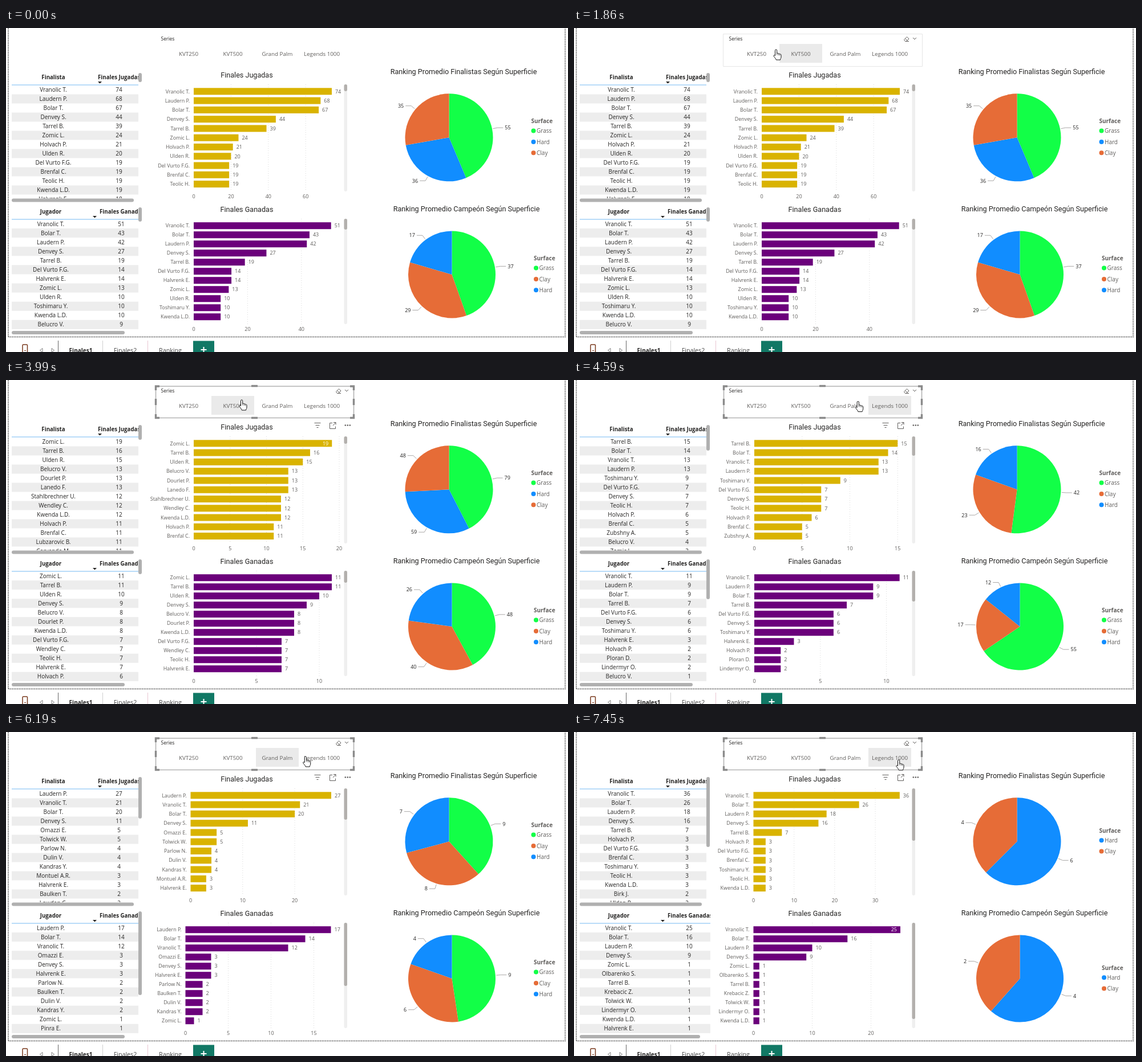
Recreate the animation shown at these times as an HTML page. Size 985 px wide and 569 px high, loop 8000 ms.

```html
<!DOCTYPE html>
<html lang="es">
<head>
<meta charset="utf-8">
<title>Finales</title>
<style>
html, body { margin: 0; width: 100%; height: 100%; overflow: hidden; background: #fff; }
svg { display: block; width: 985px; height: 569px; font-family: "Open Sans", "Noto Sans", sans-serif; }
.title { font-family: Roboto, sans-serif; }
</style>
</head>
<body>
<svg id="stage" viewBox="0 0 985 569"></svg>
<script>
const LOOP = 8000, GREY = '#605e5c', INK = '#252423';
const KEYS = 'abcdefghijklmnopqrstuvwxyzABCDEFGHIJ';
const NAMES = ('Vranolic T.|Laudern P.|Bolar T.|Denvey S.|Tarrel B.|Zomic L.|Holvach P.|Ulden R.|Del Vurto F.G.|' +
  'Brenfal C.|Teolic H.|Kwenda L.D.|Halvrenk E.|Toshimaru Y.|Belucro V.|Dourlet P.|Lanedo F.|Stahlbrechner U.|' +
  'Wendley C.|Lubzarovic B.|Corvando M.|Zubshny A.|Ploran D.|Lindermyr O.|Omazzi E.|Tolwick W.|Parlow N.|' +
  'Dulin V.|Kandras Y.|Montuel A.R.|Baulken T.|Pinra E.|Lowden C.|Birk J.|Olbarenko S.|Krebacic Z.').split('|');
const COLORS = { Grass: '#12ff47', Hard: '#118dff', Clay: '#e66c37' };
const SERIES = ['KVT250', 'KVT500', 'Grand Palm', 'Legends 1000'];
const TILE_X = [282.5, 360, 438, 516];

// axis: [zero x, px per unit, tick step, last tick, thumb bottom]
const STATES = [
  { played: 'a74 b68 c67 d44 e39 f24 g21 h20 i19 j19 k19 l19 m18', axisP: [329, 3.27, 20, 60, 111],
    won: 'a51 c43 b42 d27 e19 i14 m14 f13 h10 n10 l10 o9', axisW: [329, 4.72, 20, 40, 354],
    pieP: 'Grass 55 Hard 36 Clay 35', pieW: 'Grass 37 Clay 29 Hard 17' },
  { played: 'f19 e16 h15 o13 p13 q13 r12 s12 l12 g11 j11 t11 u11', axisP: [329, 12.75, 5, 20, 112], insideP: true,
    won: 'f11 e11 h10 d9 o8 p8 l8 i7 s7 k7 m7 g6', axisW: [329, 22, 5, 10, 356],
    pieP: 'Grass 79 Hard 59 Clay 48', pieW: 'Grass 48 Clay 40 Hard 26' },
  { played: 'e15 c14 a13 b13 n9 i7 d7 k7 g6 j5 v5 o4 f3', axisP: [316, 16.75, 5, 15, 133],
    won: 'a11 b9 c9 e7 i6 d6 n6 m3 g2 w2 x2 o1', axisW: [316, 23.15, 5, 10, 389],
    pieP: 'Grass 42.2 Clay 23 Hard 15.8', pieW: 'Grass 55 Clay 17 Hard 12' },
  { played: 'b27 a21 c20 d11 y5 z5 A4 B4 C4 D3 m3 E2 G2', axisP: [323.5, 9.13, 10, 20, 154],
    won: 'b17 c14 a12 y3 d3 m3 A2 E2 B2 C2 f1 F1', axisW: [314.5, 15, 5, 15, 446],
    pieP: 'Grass 9.2 Clay 7.8 Hard 7', pieW: 'Grass 9 Clay 6.2 Hard 3.7' },
  { played: 'a36 c26 b18 d16 e7 g3 i3 j3 n3 k3 l3 H2 h2', axisP: [314.5, 7.12, 10, 30, 191],
    won: 'a25 c16 b10 d9 f1 I1 e1 J1 z1 x1 l1 m1', axisW: [314.5, 10.3, 10, 20, 504], insideW: true, wide: true,
    pieP: 'Hard 6.25 Clay 3.75', pieW: 'Hard 3.9 Clay 2.44' }
];

const text = (x, y, s, size = 10, fill = GREY, anchor = 'middle', extra = '') =>
  `<text x="${x}" y="${y + size * .36}" font-size="${size}" fill="${fill}" text-anchor="${anchor}" ${extra}>${s}</text>`;
const rect = (x, y, w, h, fill, extra = '') =>
  `<rect x="${x}" y="${y}" width="${w}" height="${h}" fill="${fill}" ${extra}/>`;
const path = (d, stroke = GREY, w = 1, extra = '') =>
  `<path d="${d}" fill="none" stroke="${stroke}" stroke-width="${w}" ${extra}/>`;
const group = (id, body, extra = '') => `<g id="${id}" ${extra}>${body}</g>`;
const parse = s => s.split(' ').map(p => ({ name: NAMES[KEYS.indexOf(p[0])], n: +p.slice(1) }));

function table(rows, clip, y0, step, nameX, valX, right, head) {
  let s = '';
  rows.forEach((r, i) => {
    const y = y0 + i * step;
    if (i % 2) s += rect(10, y - 8, right - 10, step, '#ededed');
    s += text(nameX, y, r.name, 10, INK) + text(valX, y, r.n, 10, INK);
  });
  const bold = 'font-weight="700"';
  s += text(nameX, head.y, head.a, 9.7, INK, 'middle', bold) + text(head.x, head.y, head.b, 9.7, INK, 'start', bold);
  s += path(`M10 ${head.y + 13.5}H${right}`, '#74b9f3', 1.2);
  s += `<path d="M${head.sort - 3.5} ${head.y + 7.5}h7l-3.5 3.5z" fill="${INK}"/>`;
  return `<g clip-path="url(#${clip})">${s}</g>`;
}

function bars(rows, axis, y0, step, color, inside, top, bottom) {
  const [x0, unit, tick, last, thumb] = axis;
  let s = '';
  for (let v = 0; v <= last; v += tick) {
    const x = x0 + v * unit;
    if (v) s += path(`M${x} ${top}V${bottom}`, '#d8d8d8', 1, 'stroke-dasharray="1 3"');
    s += text(x, bottom + 9, v, 9);
  }
  rows.slice(0, 11).forEach((r, i) => {
    const y = y0 + i * step, end = x0 + r.n * unit;
    s += rect(x0, y - 6, r.n * unit, 12, color) + text(x0 - 7, y, r.name, 8.9, GREY, 'end');
    s += inside && !i ? text(end - 6, y, r.n, 9, '#fff', 'end') : text(end + 6, y, r.n, 9, GREY, 'start');
  });
  return s + rect(592.5, top, 5.5, bottom - top, '#efefef', 'rx="2.7"') +
    rect(592.5, top, 5.5, thumb - top, '#b3b0ad', 'rx="2.7"');
}

function pie(data, cx, cy, r, legendX, legendY) {
  const p = data.split(' '), parts = [];
  for (let i = 0; i < p.length; i += 2) parts.push([p[i], +p[i + 1]]);
  const sum = parts.reduce((a, q) => a + q[1], 0);
  const pt = (a, d) => [cx + d * Math.sin(a), cy - d * Math.cos(a)];
  const top = legendY + (3 - parts.length) * 9.7;
  let a = 0, s = text(legendX, top, 'Surface', 10, GREY, 'start', 'font-weight="700"');
  parts.forEach(([name, v], i) => {
    const b = a + v / sum * 2 * Math.PI, mid = (a + b) / 2, side = Math.sin(mid) > 0 ? 1 : -1;
    const [ex, ey] = pt(mid, r + 9.5), x = ex + 10 * side;
    s += `<path d="M${cx} ${cy}L${pt(a, r)}A${r} ${r} 0 ${b - a > Math.PI ? 1 : 0} 1 ${pt(b, r)}Z" fill="${COLORS[name]}"/>`;
    s += path(`M${pt(mid, r + 1.5)}L${ex} ${ey}H${x}`, '#a19f9d', .9);
    s += text(x + 3 * side, ey, Math.round(v), 9, INK, side > 0 ? 'start' : 'end');
    const y = top + 17 + i * 19.4;
    s += `<circle cx="${legendX + 4}" cy="${y}" r="4" fill="${COLORS[name]}"/>` + text(legendX + 9.5, y, name, 10, GREY, 'start');
    a = b;
  });
  return s;
}

function slicer() {
  let s = text(271.5, 19, 'Series', 8.5, INK, 'start');
  s += rect(0, 28, 75, 33, '#eaeaea', 'id="tile"');
  SERIES.forEach((n, i) => s += text(TILE_X[i] + 37.5, 45, n, 9.8));
  s += group('slicerIcons', path('M578.5 20.5l5-5 3.500 3.500-4.500 4.500h-2zM580.500 18.500l3.500 3.500M582 23.500h5M594 17l3 3 3-3'));
  s += group('thin', path('M261.500 10.500H610.500V67.500H261.500Z', '#e6e6e6'));
  s += group('selected', path('M262.500 11H609.500V66.500H262.500Z', '#b3b3b3', 1.6) +
    path('M262.500 18V11H269M603 11H609.500V18M609.500 60V66.500H603M269 66.500H262.500V60M430 10.500H441M430 66.500H441M262.500 33V44M609.500 33V44', '#8a8a8a', 3.4));
  return s;
}

function footer() {
  let s = path('M4 0V542.500H980V0', '#333', 1.5, 'stroke-dasharray="1.5 1.5"');
  s += rect(29, 556, 8.5, 18, '#fff', 'rx="1.5" stroke="#7a3a1e" stroke-width="1.5"') + path('M32 566.500h3', '#7a3a1e');
  s += path('M64 562.500v7l-4.500-3.500zM80 562.500v7l4.500-3.500z', '#777', .9);
  s += path('M91.500 549V569', '#666') + path('M169.500 549V569', '#d0d0d0') + path('M248.500 549V569', '#e8c6d2');
  s += text(131, 566, 'Finales1', 10, INK, 'middle', 'font-weight="700"');
  s += text(209, 566, 'Finales2', 10.7, '#444') + text(288, 566, 'Ranking', 10.7, '#444');
  return s + rect(328, 549.5, 37, 20, '#117865') + path('M341.500 565h10M346.500 560v10', '#fff', 2);
}

function build() {
  const title = (x, y, s) => text(x, y, s, 12.6, INK, 'middle', 'class="title"');
  const clip = (id, y, w, h) => `<clipPath id="${id}"><rect x="10" y="${y}" width="${w}" height="${h}"/></clipPath>`;
  const bar = id => rect(232, 0, 6, 0, '#b0b0b0', `id="${id}" rx="3"`);
  let s = '<defs>' + clip('c1', 70, 222, 229) + clip('c2', 306, 222, 223) + clip('c3', 306, 229, 223) + '</defs>';
  s += rect(0, 0, 985, 569, '#fff') + footer();
  s += title(422, 82, 'Finales Jugadas') + title(422, 318.5, 'Finales Ganadas');
  s += title(802, 76, 'Ranking Promedio Finalistas Según Superficie');
  s += title(807, 317, 'Ranking Promedio Campeón Según Superficie');
  STATES.forEach((d, i) => {
    const played = parse(d.played), won = parse(d.won), right = d.wide ? 239 : 232;
    s += group('data' + i,
      table(played, 'c1', 108.5, 16, 83, 198, 232, { y: 86.5, x: 161, sort: 164.5, a: 'Finalista', b: 'Finales Jugadas' }) +
      table(won, d.wide ? 'c3' : 'c2', 344, 16.07, 78.5, 202, right, { y: 322.5, x: 164, sort: 155.5, a: 'Jugador', b: 'Finales Ganadas' }) +
      rect(10, 532, d.wide ? 211 : 198, 6, '#b0b0b0', 'rx="3"') +
      bars(played, d.axisP, 111.3, 16.28, '#d9b300', d.insideP, 99, 287) +
      bars(won, d.axisW, 347.2, 16, '#6b007b', d.insideW, 335, 520));
    s += group('pie' + i, pie(d.pieP, 776.5, 192.3, 77, 920.5, 163.5) + pie(d.pieW, 781.5, 433, 76.5, 925, 404.5));
  });
  s += rect(10, 299.5, 214, 6, '#b0b0b0', 'rx="3"') + bar('scrollP') + bar('scrollW') + slicer();
  s += group('tools', path('M540.500 75.500h11M542.500 79.500h7M544.500 83.500h3') +
    path('M572 75.500h-4.500v10h10v-4M574 74.500h4v4M578 74.500l-5 5.500') +
    [594.8, 598.8, 602.8].map(x => `<circle cx="${x}" cy="79.500" r="1.300" fill="${GREY}"/>`).join(''));
  s += group('tip', rect(577.5, 62.5, 82, 23, '#fff', 'stroke="#b5b5b5"') + text(618.5, 74, SERIES[3], 11, '#444'));
  s += group('arrow', '<path d="M0 0V15.500L3.600 12.200 6 17.800 8.300 16.800 6 11.400H11Z" fill="#fff" stroke="#000" stroke-width=".9"/>');
  s += group('hand', '<path d="M-1.500 1.500a1.600 1.600 0 0 1 3.200 0v5c1-.6 2.300-.3 2.600.5 1-.5 2.100 0 2.400.8 1.200-.3 2.300.4 2.300 1.600V13c0 2.300-1.500 3-1.500 5H.3c-.5-2.300-2.600-4-4.200-6.500-.8-1.500 1-2.500 2.200-1.200l.2.300z" fill="#fff" stroke="#111"/>' +
    path('M1.700 6.500v3M4.300 7v3M6.700 8v2.500', '#111', .7));
  stage.innerHTML = s;
}

// [start, end, steps, x, y]
const MOVES = [
  [660, 1450, 12, 430, 72], [1520, 1660, 3, 398, 42], [1860, 1860, 1, 354, 38], [1925, 1990, 2, 324, 29],
  [2260, 2330, 2, 318, 27], [2660, 2730, 2, 323, 37], [2990, 3260, 5, 420, 49], [3520, 3590, 2, 431, 50],
  [3790, 3990, 3, 413, 35], [4520, 4650, 3, 540, 39], [4850, 4990, 3, 480, 40], [5380, 5590, 3, 510, 41],
  [6190, 6390, 4, 569, 49]
];
const DATA = [[0, 0], [2730, 1], [4060, 2], [5660, 3], [7190, 4]];
const PIES = [[0, 0], [2730, 1], [4120, 2], [5730, 3], [7320, 4]];
const HOVER = [[0, -1], [1590, 1], [1925, 0], [3125, 1], [4585, 3], [4920, 2], [6290, 3]];
const SCROLL_P = [[0, 95], [2730, 215], [3060, 124], [3590, 105], [4060, 215], [4320, 145], [4520, 124], [5660, 215], [5930, 152], [7190, 202]];
const SCROLL_W = [[0, 340], [2730, 447], [3060, 358], [3590, 341], [4060, 447], [4320, 385], [5660, 462], [7190, 315]];

const at = (list, t) => list.reduce((v, e) => t >= e[0] ? e[1] : v, list[0][1]);

function cursor(t) {
  let x = 772, y = 464;
  MOVES.forEach(([a, b, n, tx, ty], i) => {
    if (t < a) return;
    let k = 1;
    if (t < b) {
      const step = Math.floor((t - a) / (b - a) * (n - 1));
      k = i ? (step + 1) / n : step / (n - 1);
    }
    x += (tx - x) * k;
    y += (ty - y) * k;
  });
  return [x, y];
}

const stage = document.getElementById('stage');
build();
const el = {};
stage.querySelectorAll('[id]').forEach(e => el[e.id] = e);
const show = (id, on) => el[id].style.display = on ? '' : 'none';

function draw(t) {
  const data = at(DATA, t), pies = at(PIES, t), hover = at(HOVER, t), [x, y] = cursor(t);
  STATES.forEach((_, i) => {
    show('data' + i, i === data);
    show('pie' + i, i === pies);
  });
  el.scrollP.setAttribute('y', 79);
  el.scrollP.setAttribute('height', at(SCROLL_P, t) - 79);
  el.scrollW.setAttribute('y', 315);
  el.scrollW.setAttribute('height', at(SCROLL_W, t) - 315);
  show('tile', hover >= 0);
  if (hover >= 0) el.tile.setAttribute('x', TILE_X[hover]);
  show('slicerIcons', t >= 1520);
  show('thin', t >= 1520 && t < 2660);
  show('selected', t >= 2660);
  show('tools', t >= 2660 || t >= 660 && t < 1520 && x < 606 && y < 305);
  show('tip', t >= 6790 && t < 6930);
  show('arrow', t >= 660 && t < 1520);
  show('hand', t >= 1520);
  const move = `translate(${x} ${y})`;
  el.arrow.setAttribute('transform', move);
  el.hand.setAttribute('transform', move);
}

const start = performance.now();
function tick() {
  draw((performance.now() - start) % LOOP);
  requestAnimationFrame(tick);
}
tick();
</script>
</body>
</html>
```
